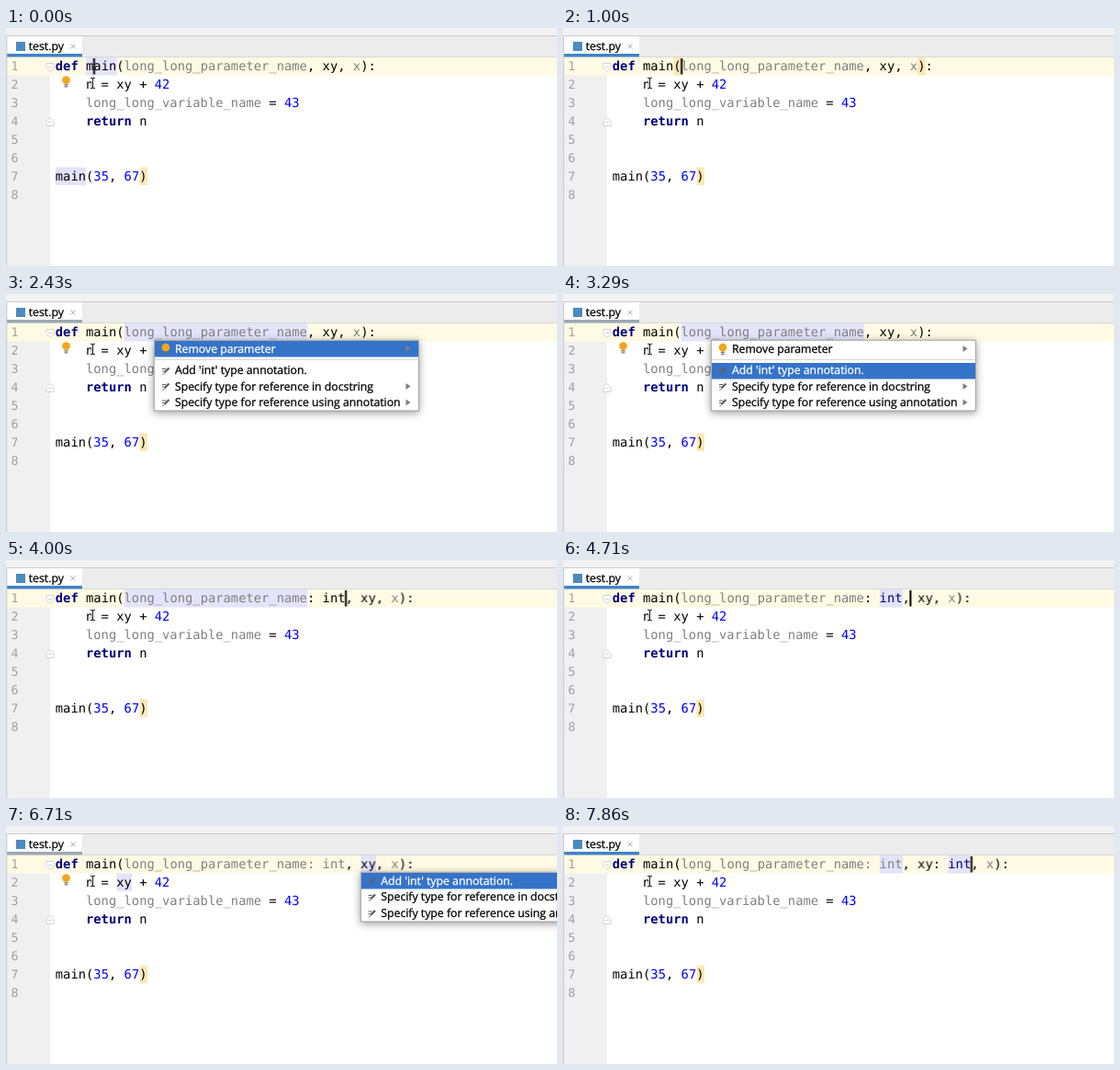
These frames come from a looping animation (600x259 px, 8000 ms). An HTML page:

```html
<!DOCTYPE html>
<html lang="en">
<head>
<meta charset="utf-8">
<title>Type annotation intention</title>
<style>
html, body { margin: 0; width: 100%; height: 100%; overflow: hidden; background: #fff; }
svg { display: block; width: 600px; height: 259px; }
text { white-space: pre; text-rendering: geometricPrecision; }
.code { font: 13.8px "DejaVu Sans Mono", monospace; }
.nums { font: 13.2px "DejaVu Sans Mono", monospace; fill: #a0a0a0; }
.ui { font: 12.25px "Open Sans", "Noto Sans", sans-serif; }
.ui text { fill: currentColor; stroke: currentColor; stroke-width: .3; }
.kw { fill: #000080; font-weight: bold; }
.num { fill: #0000ff; }
.dim { fill: #808080; }
.mark { fill: #e3e3fb; }
.brace { fill: #fbe8b6; }
.menu { filter: drop-shadow(0 2px 4px rgba(0, 0, 0, .4)); }
.box { fill: #fff; stroke: #a2a2a2; }
.pick { fill: #3573c9; }

.a { animation: 8s step-end infinite; }
.hide { opacity: 0; }

.main { animation-name: main; }
.parens { animation-name: parens; }
.param { animation-name: param; }
.int1 { animation-name: int1; }
.xy { animation-name: xy; }
.int2 { animation-name: int2; }
.bulb { animation-name: bulb; }
.blur { animation-name: blur; }
.menu1 { animation-name: menu1; }
.menu2 { animation-name: menu2; }
.pick1 { animation-name: pick1; }
.item0 { animation-name: item0; }
.item1 { animation-name: item1; }
.ann1 { animation-name: ann1; }
.ann2 { animation-name: ann2; }
.colon1 { animation-name: colon1; }
.type1 { animation-name: type1; }
.type2 { animation-name: type2; }
.tail1 { animation-name: tail1; }
.tail2 { animation-name: tail2; }
.caret { --c: 8.308px; animation-name: move, blink; }

/* highlights */
@keyframes main { 0% { opacity: 1 } 12.4% { opacity: 0 } }
@keyframes parens { 10.7% { opacity: 1 } 14.2% { opacity: 0 } }
@keyframes param { 21.3% { opacity: 1 } 55.3% { opacity: 0 } }
@keyframes int1 { 55.3% { opacity: 1 } 62.4% { opacity: 0 } 98.2%, 100% { opacity: 1 } }
@keyframes xy { 66.1% { opacity: 1 } 98.2% { opacity: 0 } }
@keyframes int2 { 98.2%, 100% { opacity: 1 } }

/* bulb, focus and menus */
@keyframes bulb {
  0% { opacity: 1 } 5.3% { opacity: 0 }
  30.3% { opacity: 1 } 49.9% { opacity: 0 }
  73.2% { opacity: 1 } 94.6% { opacity: 0 }
}
@keyframes blur {
  30.3% { fill: #9ca8b5 } 49.9% { fill: #4083c9 }
  82.1% { fill: #9ca8b5 } 94.6% { fill: #4083c9 }
}
@keyframes menu1 { 30.3% { opacity: 1 } 49.9% { opacity: 0 } }
@keyframes menu2 { 82.1% { opacity: 1 } 94.6% { opacity: 0 } }
@keyframes pick1 { 41.1%, 100% { transform: translateY(24px) } }
@keyframes item0 { 0% { color: #fff } 41.1%, 100% { color: #000 } }
@keyframes item1 { 0% { color: #000 } 41.1%, 100% { color: #fff } }

/* inserted code pushes the rest along and is coloured later */
@keyframes ann1 { 49.9%, 100% { opacity: 1 } }
@keyframes ann2 { 94.6%, 100% { opacity: 1 } }
@keyframes colon1 { 62.4%, 100% { fill: #808080 } }
@keyframes type1 { 55.3% { fill: #000080 } 62.4%, 100% { fill: #808080 } }
@keyframes type2 { 98.2%, 100% { fill: #000080 } }
@keyframes tail1 { 49.9%, 100% { transform: translateX(41.54px) } }
@keyframes tail2 {
  49.9% { transform: translateX(41.54px) }
  94.6%, 100% { transform: translateX(83.08px) }
}

@keyframes move {
  0% { transform: translateX(calc(5 * var(--c))) }
  5.3% { transform: translateX(calc(7 * var(--c))) }
  7.1% { transform: translateX(calc(8 * var(--c))) }
  12.4% { transform: translateX(calc(9 * var(--c))) }
  14.2% { transform: translateX(calc(10 * var(--c))) }
  16% { transform: translateX(calc(11 * var(--c))) }
  17.8% { transform: translateX(calc(12 * var(--c))) }
  19.6% { transform: translateX(calc(13 * var(--c))) }
  49.9% { transform: translateX(calc(38 * var(--c))) }
  58.8% { transform: translateX(calc(39 * var(--c))) }
  60.6% { transform: translateX(calc(40 * var(--c))) }
  94.6%, 100% { transform: translateX(calc(47 * var(--c))) }
}
@keyframes blink {
  0% { opacity: 1 } 30.3% { opacity: 0 } 49.9% { opacity: 1 }
  78.6% { opacity: 0 } 94.6%, 100% { opacity: 1 }
}
</style>
</head>
<body>
<svg viewBox="0 0 600 259">
  <defs>
    <g id="lamp">
      <circle cx="5" cy="4.6" r="4.4" fill="#f2a51a"/>
      <path d="M2.8 9.8h4.4M3.2 11.9h3.6" stroke="#6e6e6e" stroke-width="1.2"/>
    </g>
    <g id="pencil" fill="none" stroke="#5c6066">
      <path d="M3.5 6.5l5-5" stroke-width="2.4"/>
      <path d="M1 2.5h4M1 5h2M1.5 8.5l2-1.2" stroke-width="1"/>
    </g>
    <path id="arrow" d="M0 0l5 3.5-5 3.5z" fill="#808080"/>
    <path id="beam" d="M92 54.2q2.5 0 2.5 1.5v8.6q0 1.5-2.5 1.5M97 54.2q-2.5 0-2.5 1.5v8.6q0 1.5 2.5 1.5" fill="none"/>
  </defs>

  <!-- window and tab -->
  <rect width="600" height="259" fill="#fff"/>
  <rect width="600" height="32" fill="#ececec"/>
  <rect width="600" height="8" fill="#f2f2f2"/>
  <rect y="8" width="600" height="1" fill="#cdcdcd"/>
  <rect y="31" width="600" height="1" fill="#d9d9d9"/>
  <rect x="1" y="9" width="82" height="20" fill="#fff"/>
  <rect class="a blur" x="1" y="28" width="82" height="3.4" fill="#4083c9"/>
  <rect x="11" y="15" width="10" height="10" fill="#4b8bbe"/>
  <g class="ui"><text x="24.8" y="24">test.py</text></g>
  <path d="M70.5 17.5l5 5m0-5l-5 5" stroke="#b4b4b4"/>

  <!-- gutter -->
  <rect y="32" width="48" height="227" fill="#f0f0f0"/>
  <rect x="1" y="32" width="599" height="19.5" fill="#fffae3"/>
  <rect y="9" width="1.3" height="250" fill="#cfcfcf"/>
  <g class="nums">
    <text x="5.5" y="46.3">1</text>
    <text x="5.5" y="66.2">2</text>
    <text x="5.5" y="86.1">3</text>
    <text x="5.5" y="106">4</text>
    <text x="5.5" y="125.9">5</text>
    <text x="5.5" y="145.8">6</text>
    <text x="5.5" y="165.7">7</text>
    <text x="5.5" y="185.6">8</text>
  </g>
  <g fill="#fff" stroke="#d2d2d2">
    <path d="M44 38.5h8v5l-4 4-4-4zM46 42.5h4"/>
    <path d="M44 106.5h8v-5l-4-4-4 4zM46 102.5h4"/>
  </g>

  <!-- highlights -->
  <rect class="brace" x="145.5" y="151.5" width="8.5" height="19.5"/>
  <g class="mark">
    <path class="a hide main" d="M87.2 32h33.3v19.5h-33.3zM54 151.5h33.3v19.5h-33.3z"/>
    <rect class="a hide param" x="128.8" y="32" width="199.4" height="19.5"/>
    <rect class="a hide int1" x="344.8" y="32" width="25" height="19.5"/>
    <path class="a hide xy" d="M386.3 32h16.7v19.5h-16.7zM120.5 51.5h16.7v19.5h-16.7z"/>
    <rect class="a hide int2" x="419.5" y="32" width="25" height="19.5"/>
  </g>
  <path class="a hide parens brace" d="M120.5 32h8.3v19.5h-8.3zM386.3 32h8.3v19.5h-8.3z"/>

  <!-- code -->
  <g class="code">
    <text x="53.8" y="46.1"><tspan class="kw">def</tspan> main(<tspan class="dim">long_long_parameter_name</tspan></text>
    <g class="a hide ann1">
      <text class="a colon1" x="328" y="46.1">:</text>
      <text class="a type1" x="344.6" y="46.1">int</text>
    </g>
    <text class="a tail1" x="328" y="46.1">, xy</text>
    <g class="a hide ann2">
      <text x="402.7" y="46.1">:</text>
      <text class="a type2" x="419.3" y="46.1">int</text>
    </g>
    <text class="a tail2" x="361.2" y="46.1">, <tspan class="dim">x</tspan>):</text>
    <text x="87" y="66">n = xy + <tspan class="num">42</tspan></text>
    <text x="87" y="85.9"><tspan class="dim">long_long_variable_name</tspan> = <tspan class="num">43</tspan></text>
    <text x="87" y="105.8"><tspan class="kw">return</tspan> n</text>
    <text x="53.8" y="165.5">main(<tspan class="num">35</tspan>, <tspan class="num">67</tspan>)</text>
  </g>
  <rect class="a caret" x="53.4" y="33" width="2" height="17.5"/>
  <use class="a hide bulb" href="#lamp" x="60.5" y="52"/>

  <!-- menus -->
  <g class="a hide menu menu1 ui">
    <rect class="box" x="161.3" y="50.3" width="288" height="76.7"/>
    <rect class="a pick pick1" x="162" y="51" width="287" height="17.5"/>
    <path d="M162 71.4h287" stroke="#d4d4d4"/>
    <use href="#lamp" x="169" y="53.5"/>
    <use href="#pencil" x="169" y="79"/>
    <use href="#pencil" x="169" y="96"/>
    <use href="#pencil" x="169" y="113.5"/>
    <text class="a item0" x="184" y="64">Remove parameter</text>
    <text class="a item1" x="184" y="87.2">Add 'int' type annotation.</text>
    <text x="184" y="104.6">Specify type for reference in docstring</text>
    <text x="184" y="122">Specify type for reference using annotation</text>
    <use href="#arrow" x="435.5" y="56"/>
    <use href="#arrow" x="435.5" y="97"/>
    <use href="#arrow" x="435.5" y="114.5"/>
  </g>
  <g class="a hide menu menu2 ui">
    <rect class="box" x="386.3" y="50.3" width="288" height="53.7"/>
    <rect class="pick" x="387" y="51" width="287" height="17.5"/>
    <use href="#pencil" x="393.5" y="55.5"/>
    <use href="#pencil" x="393.5" y="73"/>
    <use href="#pencil" x="393.5" y="90.5"/>
    <text x="408.3" y="64" color="#fff">Add 'int' type annotation.</text>
    <text x="408.3" y="81.4">Specify type for reference in docstring</text>
    <text x="408.3" y="98.8">Specify type for reference using annotation</text>
  </g>

  <!-- mouse pointer -->
  <use href="#beam" stroke="#fff" stroke-width="2.6"/>
  <use href="#beam" stroke="#222" stroke-width="1.1"/>
</svg>
</body>
</html>
```
